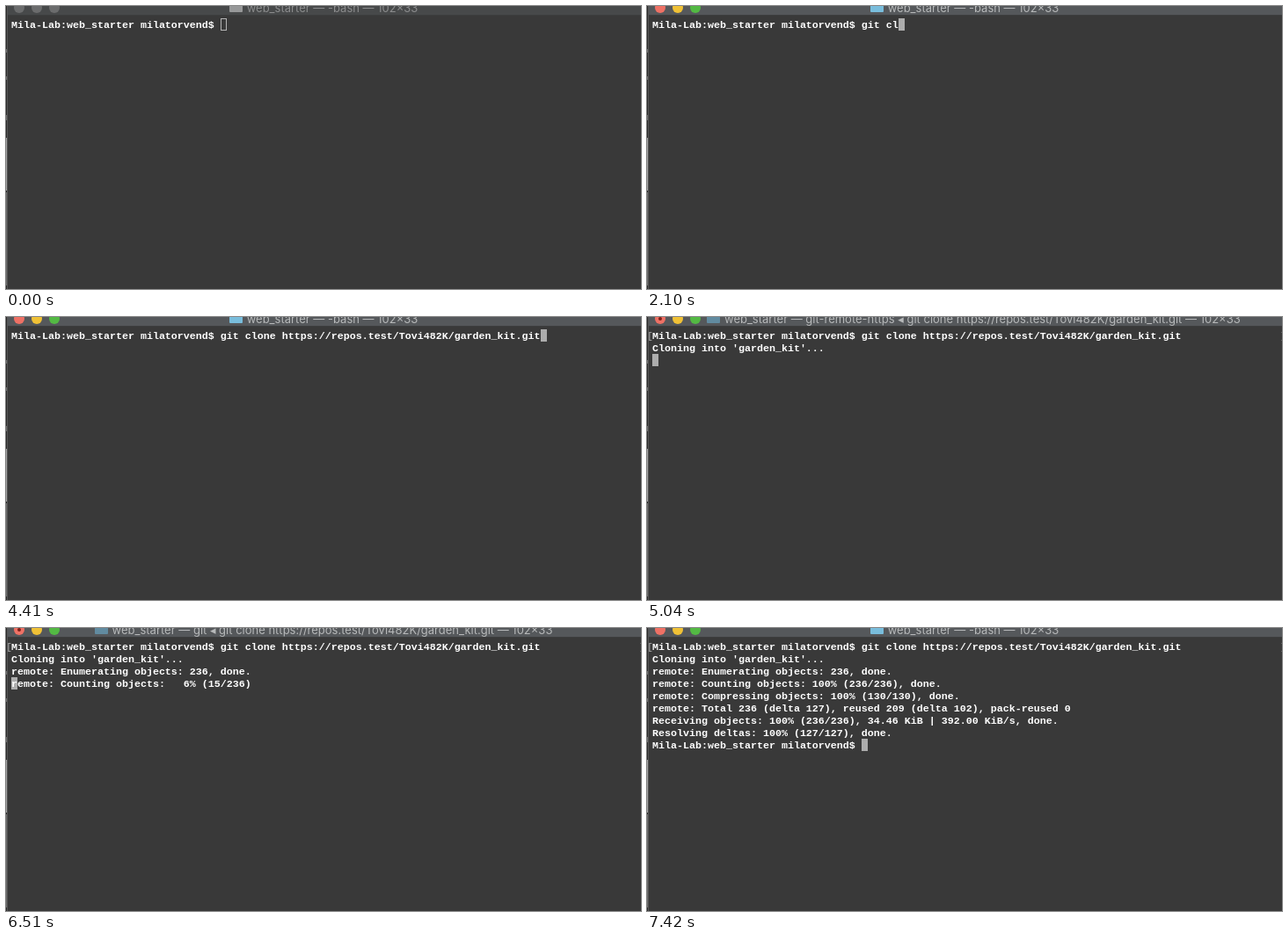
These frames come from a looping animation (722x322 px, 7770 ms). An HTML page:

```html
<!DOCTYPE html>
<html lang="en">
<head>
<meta charset="utf-8">
<title>Terminal</title>
<style>
  html, body { margin: 0; width: 100%; height: 100%; overflow: hidden; background: #393939; }
  #win { position: absolute; inset: 0; overflow: hidden; background: #393939; }
  #win * { position: absolute; box-sizing: border-box; }
  #bar { left: 2px; right: 0; top: 0; height: 11px; background: #55585b; border-bottom: 1px solid #3c3d3e; overflow: hidden; }
  #bar i { top: -4.5px; width: 12px; height: 12px; border-radius: 50%; }
  #title { left: 66px; right: 68px; top: -6px; height: 16px; display: flex; justify-content: safe center;
    font: 13px/16px Inter, Roboto, sans-serif; white-space: nowrap; color: #b7b9ba; }
  #title * { position: static; flex: none; }
  #folder { width: 15px; height: 13px; margin-right: 5px; border-radius: 1px; background: #79bddc; }
  #edge { left: 0; top: 0; width: 2px; height: 100%; background: #292929; border-right: 1px solid #565656; }
  #edge b { left: 0; width: 1px; background: #6c6c6c; }
  #cursor { width: 7px; height: 14px; background: #adadad; }
  pre { margin: 0; top: 15px; color: #fff; white-space: pre;
    font: bold 11.665px/14px "Liberation Mono", "Noto Sans Mono", monospace; }
  #text { left: 6px; }
  .mark { color: #b0b0b0; font-weight: 400; }
  .idle #bar { background: #47494a; }
  .idle #bar i { background: #6b6c6d !important; }
  .idle #title { color: #8b8c8d; }
  .idle #folder { background: #979899; }
  .idle #cursor { background: none; border: 1px solid #b4b4b4; }
  .busy #folder { background: #618ba0; }
  .busy #bar i:first-child::after { content: ""; position: absolute; left: 4px; top: 4px;
    width: 4px; height: 4px; border-radius: 50%; background: #7c2119; }
</style>
</head>
<body>
<div id="win">
  <div id="bar">
    <i style="left:7px;background:#ef7165"></i>
    <i style="left:27px;background:#f0c136"></i>
    <i style="left:47px;background:#53b943"></i>
    <div id="title"><span id="folder"></span><span id="label"></span></div>
  </div>
  <div id="edge">
    <b style="top:49px;height:4px"></b>
    <b style="top:80px;height:4px"></b>
    <b style="top:124px;height:6px"></b>
    <b style="top:150px;height:60px;background:#a2a2a2"></b>
    <b style="top:212px;height:106px"></b>
  </div>
  <div id="cursor"></div>
  <pre id="text"></pre>
  <pre class="mark" style="left:0">[</pre>
  <pre class="mark" style="left:720px">]</pre>
</div>
<script>
const LOOP = 7770, FOCUS = 70, ENTER = 4760, HELPER_END = 5740, OUTPUT = 6300, DONE = 7070;
const folder = 'web_starter', repo = 'garden_kit';
const url = `https://repos.test/Tovi482K/${repo}.git`;
const prompt = `Mila-Lab:${folder} milatorvend$ `;
const command = 'git clone ';
const keyTimes = [1050, 1120, 1330, 1470, 1890, 2030, 2240, 2380, 2520, 2660];
const PASTE = 3710;

const progress = (name, n, total) =>
  `${name}: ${String(Math.floor(n * 100 / total)).padStart(3)}% (${n}/${total})`;
const counting = n => progress('remote: Counting objects', n, 236);
const packing = n => progress('remote: Compressing objects', n, 130);
const receiving = n => progress('Receiving objects', n, 236);
const resolving = n => progress('Resolving deltas', n, 127);

const log = [
  `Cloning into '${repo}'...`,
  'remote: Enumerating objects: 236, done.',
  counting(236) + ', done.',
  packing(130) + ', done.',
  'remote: Total 236 (delta 127), reused 209 (delta 102), pack-reused 0',
  receiving(236) + ', 34.46 KiB | 392.00 KiB/s, done.',
  resolving(127) + ', done.'
];

// start time, finished log lines, line in progress
const steps = [
  [ENTER, 1, ''],
  [OUTPUT, 2, counting(3)],
  [6370, 2, counting(5)],
  [6440, 2, counting(10)],
  [6510, 2, counting(15)],
  [6580, 2, counting(85)],
  [6650, 2, counting(170)],
  [6720, 3, packing(32)],
  [6790, 3, packing(104)],
  [6860, 5, receiving(41)],
  [6930, 5, receiving(208)],
  [7000, 6, resolving(75)],
  [DONE, 7, prompt]
];

const $ = id => document.getElementById(id);
const win = $('win'), text = $('text'), label = $('label'), cursor = $('cursor');
const marks = document.querySelectorAll('.mark');

function titleAt(t) {
  let job = '-bash';
  if (t >= ENTER && t < DONE)
    job = `${t < HELPER_END ? 'git-remote-https' : 'git'} ◂ ${command}${url}`;
  return `${folder} — ${job} — 102×33`;
}

function screenAt(t) {
  const typed = command.slice(0, keyTimes.filter(k => k <= t).length);
  const first = prompt + typed + (t >= PASTE ? url : '');
  if (t < ENTER) return { lines: [first], col: first.length };
  const [, count, active] = steps.filter(s => s[0] <= t).pop();
  return {
    lines: [first, ...log.slice(0, count), active],
    col: t >= DONE ? prompt.length : 0
  };
}

let shown = '';
function draw(t) {
  const { lines, col } = screenAt(t);
  const body = lines.join('\n'), title = titleAt(t);
  const mode = t < FOCUS ? 'idle' : t >= ENTER && t < DONE ? 'busy' : '';
  const key = mode + title + body;
  if (key === shown) return;
  shown = key;
  win.className = mode;
  label.textContent = title;
  text.textContent = body;
  cursor.style.left = 6 + col * 7 + 'px';
  cursor.style.top = lines.length * 14 + 'px';
  marks.forEach(m => { m.style.visibility = t >= ENTER ? 'visible' : 'hidden'; });
}

const start = performance.now();
function tick() {
  draw((performance.now() - start) % LOOP);
  requestAnimationFrame(tick);
}
tick();
</script>
</body>
</html>
```
